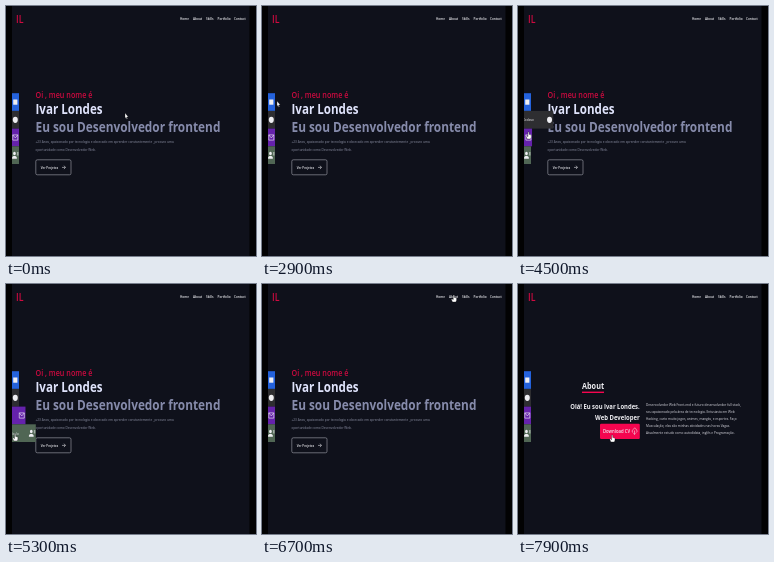
An HTML page with a canvas that plays this animation: 250 by 250 pixels, repeating every 8000 ms.

```html
<!DOCTYPE html>
<html lang="pt">
<head>
<meta charset="utf-8">
<style>
html, body { margin: 0; width: 100%; height: 100%; overflow: hidden; background: #020203; }
canvas { display: block; width: 250px; height: 250px; }
</style>
</head>
<body>
<canvas></canvas>
<script>
const LOOP = 8000, SQUEEZE = 0.8;
const BG = '#0f111b', PINK = '#f5054f', RED = '#cf0a40', WHITE = '#eeeef2';
const TITLE = '#dfe3fb', MUTED = '#868bab', SMALL = '#8d91a5';
const canvas = document.querySelector('canvas'), ctx = canvas.getContext('2d');
const ratio = window.devicePixelRatio || 1;
canvas.width = canvas.height = 250 * ratio;

const clamp = v => Math.min(1, Math.max(0, v));
const smooth = v => v * v * (3 - 2 * v);
const progress = (t, from, to) => smooth(clamp((t - from) / (to - from)));

function squeezed(x, y, draw, size = 1) {
  ctx.save();
  ctx.translate(x, y);
  ctx.scale(SQUEEZE * size, size);
  draw();
  ctx.restore();
}

function text(str, x, y, size, color, weight = 400, align = 'left') {
  squeezed(x, y, () => {
    ctx.font = `${weight} ${size}px "Open Sans", sans-serif`;
    ctx.textAlign = align;
    ctx.fillStyle = color;
    ctx.fillText(str, 0, 0);
  });
}

function rect(x, y, w, h, color) {
  ctx.fillStyle = color;
  ctx.fillRect(x, y, w, h);
}

function stroke(path, color = WHITE, width = 0.8) {
  ctx.strokeStyle = color;
  ctx.lineWidth = width;
  ctx.stroke(new Path2D(path));
}

function fill(path, color = WHITE) {
  ctx.fillStyle = color;
  ctx.fill(new Path2D(path));
}

function drawHeader() {
  text('IL', 10, 16.6, 11, RED, 600);
  const links = [['Home', 174], ['About', 187], ['Skills', 200], ['Portfolio', 211.5], ['Contact', 228]];
  for (const [label, x] of links) text(label, x, 13.6, 3.9, WHITE, 600);
}

function drawHero() {
  text('Oi , meu nome é', 29.5, 91.6, 9, RED, 600);
  text('Ivar Londes', 29.5, 108.3, 14.5, TITLE, 700);
  text('Eu sou Desenvolvedor frontend', 29.5, 126, 14.8, MUTED, 700);
  text('+23 Anos, apaixonado por tecnologia e obcecado em aprender constantemente , procuro uma',
    29.5, 137.2, 3.95, SMALL);
  text('oportunidade como Desenvolvedor Web.', 29.5, 144.8, 3.95, SMALL);
  ctx.beginPath();
  ctx.roundRect(29.8, 153.8, 35.2, 15, 1.5);
  ctx.strokeStyle = '#a5a7b0';
  ctx.lineWidth = 0.6;
  ctx.stroke();
  text('Ver Projetos', 34.8, 163, 3.7, WHITE, 600);
  squeezed(57.7, 161.4, () => stroke('M-2.5 0H2.5M.5-2L2.5 0L.5 2', WHITE, 0.7), 0.85);
}

function reveal(amount, shift, draw) {
  if (!amount) return;
  ctx.save();
  ctx.globalAlpha = amount;
  ctx.translate(0, shift * (1 - amount));
  draw();
  ctx.restore();
}

function drawAbout(t) {
  reveal(progress(t, 7200, 7500), 0, () => {
    text('About', 64, 104.6, 9.1, WHITE, 700);
    rect(64, 107.6, 22, 1.4, PINK);
  });
  reveal(progress(t, 7300, 7700), 8, () => {
    text('Olá! Eu sou Ivar Londes.', 121.7, 125, 7.35, WHITE, 700, 'right');
    text('Web Developer', 121.7, 135.6, 7.45, WHITE, 700, 'right');
    ctx.beginPath();
    ctx.roundRect(82, 139.8, 39.8, 15.2, 1.2);
    ctx.fillStyle = PINK;
    ctx.fill();
    text('Download CV', 85, 149.4, 5.3, WHITE, 600);
    squeezed(116.5, 147.2, () =>
      stroke('M-2 1.2H-3C-4.5-1-2-2-1.8-2C-1-4.5 2.5-4 2.5-1.5C4.5-1.5 4 1.2 3 1.2H2M0-.8V3.8M-1.5 2.4L0 3.8L1.5 2.4', WHITE, 0.7), 0.85);
    [
      'Desenvolvedor Web Front-end e futuro desenvolvedor full stack,',
      'sou apaixonado pela área de tecnologia. Entusiasta em Web',
      'Hacking, curto muito jogos, animes, mangás, e esportes. Faço',
      'Musculação, elas são minhas atividades nas horas Vagas.',
      'Atualmente estudo como autodidata, inglês e Programação.'
    ].forEach((line, i) => text(line, 128, 121.6 + 7 * i, 3.98, '#dcdce4'));
  });
}

const SOCIAL = [
  { label: 'Rotalume', color: '#2462dc', open: 3050, close: 3600,
    icon: () => rect(-3, -3, 6, 6, WHITE) },
  { label: 'Kodavo', color: '#2e2e31', open: 3600, close: 4450,
    icon: () => { ctx.beginPath(); ctx.arc(0, 0, 3.6, 0, 7); ctx.fillStyle = WHITE; ctx.fill(); } },
  { label: 'Email', color: '#6522ac', open: 4450, close: 5040,
    icon: () => stroke('M-3.6-3H3.6V3H-3.6ZL0 .5L3.6-3') },
  { label: 'Currículo', color: '#506654', open: 5040, close: 5500,
    icon: () => fill('M-3.2-2a2 2 0 1 0 4 0a2 2 0 1 0-4 0M-4.6 4V2.6C-3.5.5 1 .5 2.2 2.6V4ZM2.4-3H4.6V-2H2.4ZM2.4-.8H4.6V.2H2.4Z') }
];

function drawSocial(t) {
  ctx.save();
  ctx.beginPath();
  ctx.rect(6, 80, 40, 90);
  ctx.clip();
  SOCIAL.forEach((item, i) => {
    const out = progress(t, item.open, item.open + 400) - progress(t, item.close, item.close + 400);
    const right = 13 + 23.3 * out, y = 87.2 + 17.7 * i;
    rect(6, y, right - 6, 17.7, item.color);
    if (out > 0.02) text(item.label, right - 30.3, y + 10.4, 3.9, WHITE);
    squeezed(right - 3.7, y + 8.9, item.icon, 0.87);
  });
  ctx.restore();
}

// time, x, y
const PATH = [
  [0, 119, 107], [700, 119, 107], [1100, 56, 138], [1300, 53.5, 132.5], [2100, 46, 126],
  [2900, 15, 95], [3100, 10.5, 95], [3450, 10.5, 97], [3700, 10.5, 113], [4250, 10.5, 119],
  [4500, 10.5, 126], [4900, 10.5, 133], [5100, 9.5, 146], [5300, 9, 150], [5500, 30, 146],
  [5800, 140, 68], [6300, 191.8, 11], [6900, 191.8, 11], [7200, 180, 40], [7700, 102, 124],
  [7900, 94.2, 151], [8000, 94.2, 151]
];
const SHAPES = {
  arrow: 'M0 0V6.2L1.5 4.9L2.6 7.2L3.7 6.7L2.7 4.5H4.8Z',
  hand: 'M-.8 0H.8V2.8L4 3.4V6L3 8H-1.8L-3.5 5.2L-2.6 4.4L-.8 5.4Z',
  beam: 'M-1.5-3.2H1.5M0-3.2V3.2M-1.5 3.2H1.5'
};

function cursorShape(t) {
  if (t >= 1100 && t < 2200) return 'beam';
  const overLink = (t >= 3050 && t < 5500) || (t >= 6600 && t < 6950) || t >= 7850;
  return overLink ? 'hand' : 'arrow';
}

function drawCursor(t) {
  const next = PATH.findIndex(p => p[0] > t);
  const [t0, x0, y0] = PATH[next - 1], [t1, x1, y1] = PATH[next];
  const k = (t - t0) / (t1 - t0), name = cursorShape(t);
  squeezed(x0 + (x1 - x0) * k, y0 + (y1 - y0) * k, () => {
    if (name === 'beam') return stroke(SHAPES.beam, '#c4c4cc', 0.7);
    fill(SHAPES[name], '#fff');
    stroke(SHAPES[name], '#08080c', 0.4);
  }, 0.87);
}

function render(now) {
  const t = now % LOOP;
  ctx.setTransform(ratio, 0, 0, ratio, 0, 0);
  rect(0, 0, 250, 250, '#020203');
  rect(6, 0, 237.5, 250, BG);
  const scroll = 250 * progress(t, 6850, 7300);
  if (scroll < 250) {
    ctx.save();
    ctx.translate(0, -scroll);
    drawHero();
    ctx.restore();
  }
  drawAbout(t);
  drawHeader();
  drawSocial(t);
  drawCursor(t);
  requestAnimationFrame(() => render(performance.now()));
}
render(performance.now());
</script>
</body>
</html>
```
